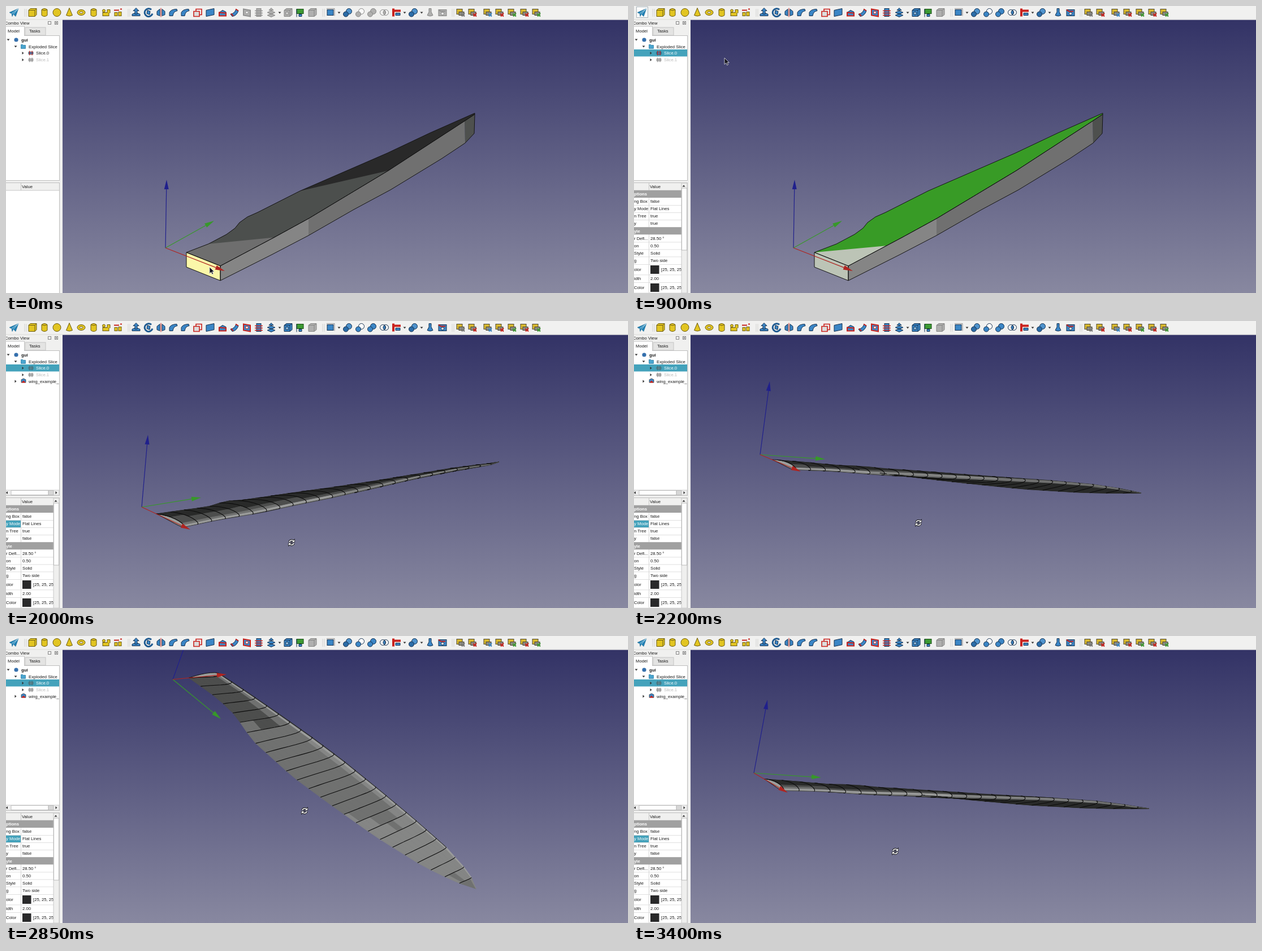
Recreate the animation shown at these times as an HTML page with a canvas. Size 1100 by 509 pixels, loop 3450 ms.

```html
<!DOCTYPE html>
<html lang="en">
<head>
<meta charset="utf-8">
<title>Wing slice</title>
<style>
html, body { margin: 0; width: 100%; height: 100%; overflow: hidden; background: #333365; }
canvas, svg { position: absolute; left: 0; top: 0; width: 1100px; height: 509px; }
text { font: 7.7px "Liberation Sans", Arial, sans-serif; fill: #1c1c1c; white-space: pre; }
.b { font-weight: bold; }
.w { fill: #fff; }
.dim { fill: #b9b9b9; }
.off { filter: grayscale(1) opacity(.55); }
</style>
</head>
<body>
<canvas id="view" width="1100" height="509"></canvas>
<svg id="ui" viewBox="0 0 1100 509"></svg>
<script>
const LOOP = 3450, STEP = 50;
const SELECT = 400, HOVER = 650, DONE = 1000, SPIN = 1700;
const $ = id => document.getElementById(id);
const g = $('view').getContext('2d');

// ---------- interface ----------
const BLUE = '#3b86c6', YEL = '#e2c522', RED = '#c9221d', GREEN = '#3d9a33';
const path = (d, fill = 'none', line = '#15304f', w = 1) =>
  `<path d="${d}" fill="${fill}" stroke="${line}" stroke-width="${w}"/>`;
const ball = (x, y, r, fill, line = '#15304f') =>
  `<circle cx="${x}" cy="${y}" r="${r}" fill="${fill}" stroke="${line}"/>`;
const box = (x, y, w, h, fill, line = 'none') =>
  `<rect x="${x}" y="${y}" width="${w}" height="${h}" fill="${fill}" stroke="${line}"/>`;
const label = (x, y, s, cls = '') => `<text x="${x}" y="${y + 2.7}" class="${cls}">${s}</text>`;
const group = (id, body, extra = '') => `<g id="${id}" ${extra}>${body}</g>`;

const OLIVE = '#6b5a10';
const tube = path('M-5-5Q0-9 5-5V5Q0 9-5 5Z', YEL, OLIVE) + path('M-5-5Q0-2 5-5', 'none', OLIVE);
const sheet = path('M-7-4L7-7V4L-7 7Z', BLUE);
const block = path('M-7-4L-3-7H7V4L3 7H-7Z', BLUE) + path('M-7-4H3V7M3-4L7-7');
const pair = (a, b) => ball(2.5, -2, 5, a) + ball(-3, 3, 4.5, b);
const scale = c => box(-7, -6, 10, 9, '#d9b92f', '#4c4630') + box(-3, -1, 9, 6, '#8d8d86', '#4c4630') + path('M1 2L7 7M7 1L2 7', 'none', c, 2);
const ICON = {
  plane: path('M-8 0L8-7L3 7L-1 3L-3 7L-4 2Z', '#1f80b4', '#17648f', .6) + path('M-4 2L8-7L-1 3', 'none', '#d5ecf7', .8),
  cube: path('M-7-4L-4-7H7V4L4 7H-7Z', YEL, OLIVE) + path('M-7-4H4V7M4-4L7-7', 'none', OLIVE),
  tube,
  ball: ball(0, 0, 7, YEL, OLIVE),
  cone: path('M0-8L5.5 5Q0 8-5.5 5Z', YEL, OLIVE),
  ring: `<ellipse rx="7" ry="5" fill="${YEL}" stroke="${OLIVE}"/><ellipse rx="3" ry="1.6" fill="#fff" stroke="${OLIVE}"/>`,
  prims: box(-6, 0, 11, 6, YEL, OLIVE) + ball(-4, -3, 2.5, YEL, OLIVE) + path('M2 0V-5H7V1', YEL, OLIVE),
  build: box(-6, 0, 5, 6, YEL, OLIVE) + box(1, -1, 5, 7, YEL, OLIVE) + path('M-7-4H2M4-6H7', 'none', RED, 2),
  extrude: path('M-7 3L0 0L7 3V6H-7Z', BLUE) + path('M0-8L5-3H2V3H-2V-3H-5Z', BLUE),
  revolve: path('M5-5A7 7 0 1 0 7 2', 'none', '#205b91', 3) + path('M-2-4L3-2L2 4L-3 2Z', BLUE),
  mirror: path('M-2-6V6L-7 4V-2ZM2-6V6L7 4V-2Z', BLUE) + path('M0-8V8', 'none', RED),
  fillet: path('M-7 6V0Q-4-6 6-6L7-3Q0-2-1 6Z', BLUE),
  offset: path('M-3-6H7V4H-3Z', '#eee', RED, 1.6) + path('M-7-2H3V7H-7Z', '#ddd', RED, 1.6),
  sheet,
  loft: path('M-6 6V0L0-4L6-1V6Z', BLUE) + path('M-6 6H6V1L-6 0Z', 'none', RED, 2),
  sweep: path('M-7 3Q0 2 3-6L7-3Q4 6-4 7Z', BLUE) + path('M-6 2L-2 6M2-6L7-3', 'none', RED, 2),
  section: path('M-6-6L6-4V7L-6 5Z', BLUE, RED, 2) + ball(0, 0, 2.3, '#eee', RED),
  cuts: box(-4, -7, 8, 14, BLUE, '#15304f') + path('M-7-3H7M-7 1H7M-7 5H7', 'none', RED, 1.6),
  stack: path('M0-8L4-4H-4ZM-7 0L0-3L7 0L0 3ZM-7 5L0 2L7 5L0 8Z', BLUE),
  hollow: block + path('M-4-1H0V4H-4Z', '#9cc7ea'),
  flag: box(-6, -6, 12, 8, GREEN, '#174d12') + path('M-6 8V-6M-2 3H3V7H-2Z', BLUE),
  block,
  part: box(-6, -5, 11, 10, BLUE, '#15304f') + path('M-7-7H7V6', 'none', '#777', .8),
  two: pair('#4f93cd', '#2c6da8'),
  cut: pair('#fff', BLUE),
  union: pair(BLUE, BLUE),
  common: ball(2.5, 0, 5, '#f2f2f2') + ball(-2.5, 0, 5, '#f2f2f2') + path('M0-4Q4 0 0 4Q-4 0 0-4', BLUE),
  join: path('M-6-7V7M-6-3H7', 'none', RED, 4) + path('M-2 1H6V5H-2Z', BLUE),
  flask: path('M-2-7H2V-1L5 5Q0 8-5 5L-2-1Z', BLUE),
  shot: box(-7, -5, 14, 11, BLUE, '#15304f') + path('M-7-5L-3-2H5', 'none', RED, 2) + ball(0, 2, 2.5, '#eee'),
  m1: scale('#777'), m2: scale(RED), m3: scale(BLUE), m4: scale(GREEN)
};
const bar = `plane 14,cube 47,tube 68,ball 90,cone 112,ring 133,tube 155,prims 177,build 198,
extrude 230,revolve 252,mirror 274,fillet 296,fillet 317,offset 339,sheet 361,loft 383,sweep 404,
section 426 d,cuts 447 d,stack 469 d,hollow 499 d,flag 520,block 542 x,part 574,two 604,cut 626 d,
union 647 d,common 669 d,join 691,two 720,flask 750 d,shot 772 d,m1 804,m2 825,m3 852,m2 873,m4 895,m2 917,m4 938`
  .split(',').map(s => s.trim().split(' '));

const tri = (x, y, open) => path(open ? `M${x - 2.5} ${y - 1.5}h5l-2.5 3z` : `M${x - 1.5} ${y - 2.5}v5l3-2.5z`, '#333', 'none');
const slice = (x, y) => path(`M${x - 4} ${y - 2}h8v4h-8z`, BLUE, '#333', .7) + path(`M${x - 2} ${y - 4}v8M${x + 2} ${y - 4}v8`, 'none', RED, 1.3);

function toolbar() {
  let s = box(0, 0, 1100, 24.5, '#f1f1f0') + box(0, 23.5, 1100, 1, '#dcdcda');
  s += group('hover', box(4.5, 1.5, 20, 19, '#fbfbfb', '#a9b4ba'));
  for (const x of [33, 216, 560, 789])
    s += path(`M${x} 5V19M${x + 3} 5V19`, 'none', '#d2d2d0', 1);
  for (const [name, x, mode] of bar)
    s += `<g transform="translate(${x} 11.5)" class="${mode ? 'off ' + mode : ''}">${ICON[name]}</g>`;
  for (const x of [484, 589, 705, 735]) s += tri(x, 12, true);
  return s;
}

function tree() {
  let s = box(0, 24, 100, 485, '#f0f0ef') + label(-2, 30, 'Combo View');
  s += box(74.5, 27.5, 5, 5, 'none', '#888') + box(86.5, 27.5, 5, 5, 'none', '#888') + path('M87.5 28.5l3 3m0-3l-3 3', 'none', '#555', .8);
  s += box(34, 38, 36, 14, '#e4e4e3', '#c4c4c4') + box(-1, 36, 33.5, 17, '#fff', '#c4c4c4');
  s += label(3, 44.5, 'Model') + label(41, 44.5, 'Tasks');
  s += box(-1, 52.5, 95.5, 257, '#fff', '#bdbdbd') + box(0, 51.5, 32, 3, '#fff');
  s += group('sel', box(0, 77, 94, 12.5, '#44a2bb'));
  s += tri(4, 60, true) + ball(18, 60, 3.6, '#3570ad', 'none') + label(27, 60, 'gui', 'b');
  s += tri(17, 72, true) + path('M26.5 68.5h3l1 1h4v6h-8z', '#4aa5cf', '#2b7ea6', .8) + label(40, 72, 'Exploded Slice');
  s += tri(30, 83.5) + group('icon0', slice(44, 83.5)) + `<text id="name0" x="53" y="86.2">Slice.0</text>`;
  s += tri(30, 95.5) + `<g class="off">${slice(44, 95.5)}</g>` + label(53, 95.5, 'Slice.1', 'dim');
  s += group('result', tri(17, 107) + path('M27 104l4-2 4 2v5h-8z', BLUE, '#333', .7) + path('M27 109.5l4-4 4 4z', RED, 'none') +
    label(40, 107, 'wing_example_') +
    box(0, 300, 94, 9, '#eee', '#ccc') + box(9, 300.5, 66, 8, '#fff', '#bbb') + box(75, 300.5, 9, 8, '#d6d6d6', '#bbb') +
    tri(89, 304.5) + path('M3 302v5l-3-2.5z', '#333', 'none'), 'clip-path="url(#side)"');
  return s;
}

function props() {
  let s = box(-1, 313.5, 95.5, 197, '#fff', '#bdbdbd') + box(0, 314, 94, 13, '#f0f0ef') + box(0, 326.5, 94, 1, '#c6c6c6') + box(26, 314, 1, 13, '#c6c6c6');
  s += label(28, 320.5, 'Value');
  const rows = [['ng Box', 'false', 346.5], ['y Mode', 'Flat Lines', 359.5], ['n Tree', 'true', 372.5], ['y', '', 385.5],
    ['r Defl...', '28.50 °', 412], ['on', '0.50', 425], ['Style', 'Solid', 438], ['g', 'Two side', 451.5],
    ['olor', 0, 467.5], ['idth', '2.00', 483.5], ['Color', 0, 499.5]];
  let r = box(26, 327, 1, 182, '#d4d4d4');
  r += group('mode', box(0, 353, 26, 13, '#44a2bb'));
  for (const [k, v, y] of rows) {
    r += box(0, y + (v === 0 ? 9 : 6.5), 84, .8, '#d8d8d8');
    r += `<text ${k === 'y Mode' ? 'id="modeName"' : ''} x="0" y="${y + 2.7}">${k}</text>`;
    r += v === 0 ? box(29, y - 7.5, 15.5, 15, '#29292a') + label(48, y, '[25, 25, 25]') : label(29, y, v);
  }
  r += `<text id="vis" x="29" y="388.2"></text>`;
  for (const [k, y] of [['ptions', 333.5], ['yle', 398.8]])
    r += box(0, y - 6.5, 84, 13, '#a0a0a0') + label(0, y, k, 'b w');
  r = `<g clip-path="url(#cells)">${r}</g>`;
  r += box(84, 314, 10, 195, '#efefee', '#c8c8c8') + box(84.5, 323, 9, 110, '#fff', '#bbb') + path('M85.5 320.5h5l-2.5-3z', '#333', 'none');
  return s + group('props', r);
}

$('ui').innerHTML = `<clipPath id="side"><rect y="52" width="94" height="260"/></clipPath>
<clipPath id="cells"><rect y="327" width="84" height="182"/></clipPath>` + tree() + props() + toolbar() +
  group('arrow', path('M0 0V11.5L2.8 9L4.6 13L6.6 12L4.8 8.3H8.3Z', '#14141c', '#e8e8f0', .8)) +
  group('orbit', ['#111', '#fff'].map((c, i) =>
    path('M-4-1A4.2 4.2 0 0 1 3-3M4 1A4.2 4.2 0 0 1-3 3', 'none', c, i ? 1.5 : 3.4) +
    path('M5-5V-1H1ZM-5 5V1H-1Z', c, c, i ? .2 : 1.6)).join(''));

const show = (id, on) => $(id).style.display = on ? '' : 'none';
const delayed = [...document.querySelectorAll('.d')];

// ---------- motion ----------
// Linear look-up in rows that start with their key.
function at(rows, k) {
  let i = 1;
  while (i < rows.length - 1 && rows[i][0] < k) i++;
  const a = rows[i - 1], b = rows[i];
  const f = Math.min(1, Math.max(0, (k - a[0]) / (b[0] - a[0])));
  return a.slice(1).map((v, n) => v + (b[n + 1] - v) * f);
}
const POINTER = [[0, 360, 463], [350, 66, 82], [550, 66, 82], [700, 15, 9], [750, 15, 9], [900, 160, 92], [1100, 161, 93],
  [1600, 560, 420], [1700, 560, 420], [2000, 505, 393], [2200, 503, 358], [2400, 506, 318], [2750, 528, 310], [2850, 528, 310],
  [3300, 477, 357], [3400, 462, 382]];
// time, origin, x axis, root-to-tip, y axis, z axis on screen
const POSE = [
  [1700, 282, 429, 105, 41, 547, -239, 86, -48, 2, -121],
  [2000, 240, 330, 86, 40, 632, -80, 105, -17, 11, -128],
  [2200, 223, 237, 72, 30, 674, 68, 115, 8, 17, -130],
  [2400, 264, 110, 83, -1, 598, 311, 99, 57, 42, -123],
  [2750, 295, 77, 95, -9, 536, 371, 85, 70, 42, -118],
  [2850, 295, 77, 95, -9, 536, 371, 85, 70, 42, -118],
  [3300, 230, 180, 70, 20, 666, 186, 114, 33, 30, -129],
  [3400, 212, 243, 60, 35, 699, 63, 119, 8, 24, -130]];

// ---------- wing ----------
// span fraction, chordwise place, height
const LEAD = [[0, .88, .005], [.1, .845, .032], [.217, .817, .045], [.327, .756, .07], [.434, .692, .082], [.57, .573, .094],
  [.708, .438, .104], [.839, .313, .094], [.93, .19, .055], [.975, .1, .02], [1, 0, 0]];
const TRAIL = [[0, .3, 0], [.083, .285, 0], [.146, .248, -.014], [.183, .18, -.026], [.209, .11, -.026], [.244, .04, -.05],
  [.278, 0, -.08], [.426, -.115, -.118], [.573, -.137, -.131], [.709, -.146, -.133], [.855, -.137, -.102], [.95, -.08, -.05], [1, 0, 0]];
const SPANS = 25, CHORDS = 10, UNIT = 136;

function surface(side) {
  return Array.from({ length: SPANS + 1 }, (_, i) => {
    const s = i / SPANS, [lx, lz] = at(LEAD, s), [tx, tz] = at(TRAIL, s), chord = lx - tx;
    return Array.from({ length: CHORDS + 1 }, (_, j) => {
      const q = (1 + Math.cos(Math.PI * j / CHORDS)) / 2;
      const half = .55 * (.2969 * Math.sqrt(q) - .126 * q - .3516 * q * q + .2843 * q ** 3 - .1036 * q ** 4);
      const z = lz + (tz - lz) * q + chord * (.1 * q * (1 - q) + side * half);
      return [lx - chord * q, s, z];
    });
  });
}
const UPPER = surface(1), LOWER = surface(-1);
const LEVELS = [41, 77, 112, 133, 155];
const tone = v => LEVELS.reduce((a, b) => Math.abs(b - v) < Math.abs(a - v) ? b : a);
const solid = ([x, s, z]) => [x + .6 * s, 5.65 * s, z];
const minus = (a, b) => a.map((v, i) => v - b[i]);
const area3 = (u, v) => Math.hypot(u[1] * v[2] - u[2] * v[1], u[2] * v[0] - u[0] * v[2], u[0] * v[1] - u[1] * v[0]);

function poly(pts, fill, line, w = 1) {
  g.beginPath();
  pts.forEach(p => g.lineTo(p[0], p[1]));
  g.closePath();
  if (fill) { g.fillStyle = fill; g.fill(); }
  if (line) { g.strokeStyle = line; g.lineWidth = w; g.stroke(); }
}

function wing([ox, oy, xx, xy, wx, wy, , , zx, zy]) {
  const flat = ([x, s, z]) => [ox + x * xx + s * wx + z * zx, oy + x * xy + s * wy + z * zy];
  const ribs = new Path2D();
  for (const [mesh, dir] of [[LOWER, 1], [UPPER, -1]]) {
    const scr = mesh.map(row => row.map(flat));
    for (let i = 0; i < SPANS; i++) for (let j = 0; j < CHORDS; j++) {
      const pick = m => [m[i][j], m[i][j + 1], m[i + 1][j + 1], m[i + 1][j]];
      const [a, b, c, d] = pick(scr), [A, B, C, D] = pick(mesh).map(solid);
      const u = minus(c, a), v = minus(d, b);
      const face = dir * (u[0] * v[1] - u[1] * v[0]);
      if (face <= 0) continue;
      const shade = tone(210 * face / (area3(minus(C, A), minus(D, B)) * UNIT * UNIT + 1e-6));
      const col = `rgb(${shade},${shade + 1},${shade})`;
      poly([a, b, c, d], col, col, .8);
      ribs.moveTo(...a);
      ribs.lineTo(...b);
    }
  }
  poly([...UPPER[0], ...LOWER[0].slice().reverse()].map(flat), '#9b9d9b', '#111');
  g.strokeStyle = '#0c0c0c';
  g.lineWidth = 1.1;
  g.stroke(ribs);
}

// ---------- uncut block ----------
const BACK = [[319, 437], [358, 422], [390, 405], [405, 394], [413, 384], [427, 374], [445, 366], [520, 328], [674, 261], [750, 225], [829, 190]];
const RIM = [[829, 192], [811, 204], [676, 292], [535, 377], [474, 410.5], [379, 461]];
const KEEL = [[379, 487], [470, 441], [535, 407], [615, 361], [680, 326], [770, 271], [812, 243], [828, 226]];
const FRONT = [[319, 437], [379, 461], [379, 487], [319, 463]];

function slab(t) {
  const picked = t >= SELECT, [tip, shoulder, fade, mid, near, corner] = RIM;
  if (picked) {
    poly([...BACK, ...RIM], '#389b26');
    poly([BACK[0], [448, 425], corner], '#bcc4b6');
  } else {
    poly([...BACK, ...RIM], '#292929');
    poly([...BACK.slice(0, 8), fade, mid, near, corner], '#4c4f4d');
    poly([BACK[0], BACK[1], near, corner], '#6e6e6e');
  }
  poly([corner, near, mid, ...KEEL.slice(0, 3).reverse()], '#858585');
  poly([mid, fade, shoulder, ...KEEL.slice(2, 7).reverse()], '#707070');
  poly([shoulder, tip, KEEL[7], KEEL[6]], '#4e504e');
  poly(FRONT, picked ? '#bcc4b6' : t < STEP ? '#faf7a9' : '#929292', '#111');
  poly([...BACK, ...RIM], null, '#141414');
  poly([...RIM, ...KEEL], null, '#141414');
}

function axis(ox, oy, dx, dy, col) {
  const len = Math.hypot(dx, dy), ux = dx / len, uy = dy / len;
  const tx = ox + dx, ty = oy + dy, bx = tx - ux * 17, by = ty - uy * 17;
  poly([[ox, oy], [bx, by]], null, col, 1.2);
  poly([[tx, ty], [bx - uy * 4, by + ux * 4], [bx + uy * 4, by - ux * 4]], col);
}

const sky = g.createLinearGradient(0, 25, 0, 509);
sky.addColorStop(0, '#333366');
sky.addColorStop(1, '#8888a0');

function draw(t) {
  g.fillStyle = sky;
  g.fillRect(100, 24, 1000, 485);
  const pose = at(POSE, t), [ox, oy, xx, xy, , , yx, yy, zx, zy] = pose;
  if (t < DONE) slab(t); else wing(pose);
  axis(ox, oy, zx, zy, '#20208c');
  axis(ox, oy, yx, yy, '#37982a');
  axis(ox, oy, xx, xy, '#b02420');

  const picked = t >= SELECT, done = t >= DONE;
  show('sel', picked);
  show('props', picked);
  show('hover', t >= HOVER && t < DONE + 100);
  show('result', done);
  show('mode', done);
  $('modeName').setAttribute('class', done ? 'w' : '');
  $('name0').setAttribute('class', picked ? 'w' : '');
  $('icon0').setAttribute('class', done ? 'off' : '');
  $('vis').textContent = done ? 'false' : 'true';
  delayed.forEach(e => e.classList.toggle('off', !picked));

  const spin = t > SPIN, [cx, cy] = at(POINTER, t);
  show('arrow', !spin);
  show('orbit', spin);
  $(spin ? 'orbit' : 'arrow').setAttribute('transform', `translate(${cx} ${cy})`);
}

const start = performance.now();
function tick(now) {
  const t = Math.max(0, now - start) % LOOP;
  draw(Math.floor(t / STEP) * STEP);
  requestAnimationFrame(tick);
}
draw(0);
requestAnimationFrame(tick);
</script>
</body>
</html>
```
